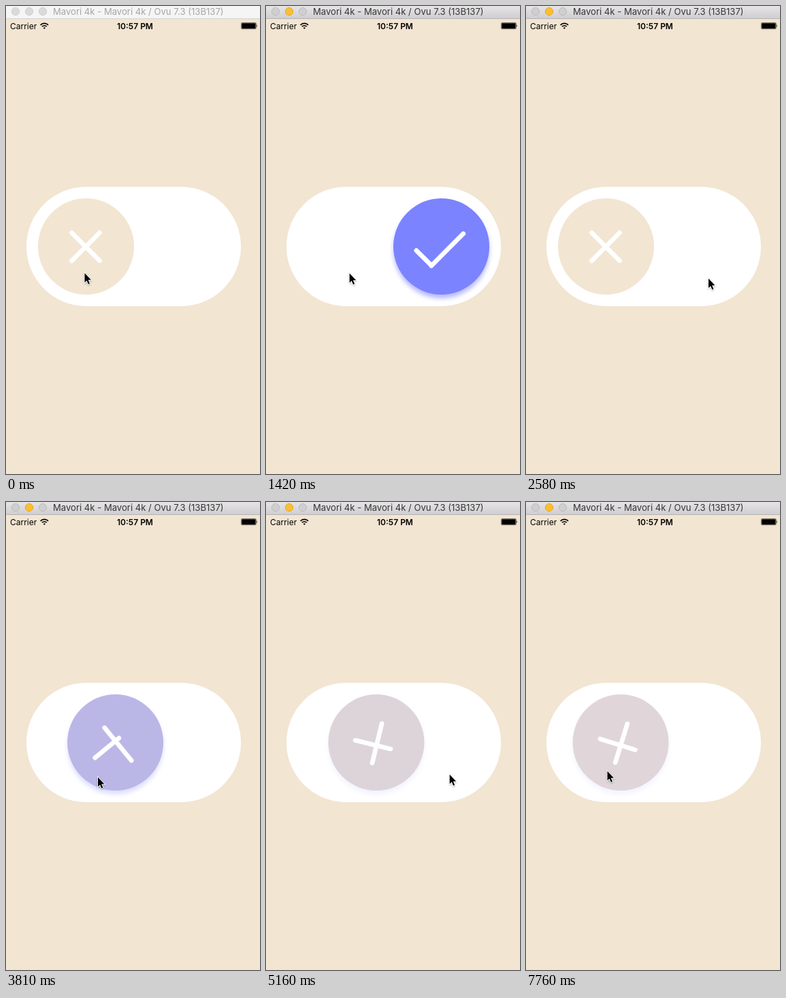
An HTML page that plays this animation: 373x686 px, repeating every 8000 ms.

```html
<!DOCTYPE html>
<html lang="en">
<head>
<meta charset="utf-8">
<title>Toggle switch</title>
<style>
  html, body { margin: 0; width: 100%; height: 100%; overflow: hidden; background: #f2e5d2; }
  svg { display: block; width: 373px; height: 686px; }
  text { font-family: Inter, Roboto, sans-serif; font-size: 12px; }
  #bar { fill: #f5f5f5; }
  #edge { fill: #d4d4d4; }
  #title { font-size: 13.1px; fill: #a6a6a6; }
  #lights { fill: #dadada; stroke: #cecece; }
  .active #bar { fill: url(#chrome); }
  .active #edge { fill: #b5b3b5; }
  .active #title { fill: #363636; }
  .active #lights { fill: #d0cfd0; stroke: #bcbbbc; }
  .active #minimize { fill: #fdbf2f; stroke: #e4a528; }
</style>
</head>
<body>
<svg id="stage" viewBox="0 0 373 686">
  <defs>
    <linearGradient id="chrome" x2="0" y2="1">
      <stop stop-color="#e6e4e6"/><stop offset="1" stop-color="#d0ced0"/>
    </linearGradient>
    <filter id="blur" x="-20%" y="-20%" width="140%" height="140%">
      <feGaussianBlur stdDeviation="3"/>
    </filter>
    <filter id="soft" x="-50%" y="-50%" width="200%" height="200%">
      <feDropShadow dx="0" dy="1" stdDeviation="1" flood-opacity=".35"/>
    </filter>
  </defs>
  <rect width="373" height="686" fill="#f2e5d2"/>

  <rect id="bar" width="373" height="18"/>
  <rect id="edge" y="18" width="373" height="1"/>
  <g id="lights">
    <circle cx="14" cy="8" r="5.6"/>
    <circle id="minimize" cx="34" cy="8" r="5.6"/>
    <circle cx="54" cy="8" r="5.6"/>
  </g>
  <text id="title" x="69" y="13">Mavori 4k - Mavori 4k / Ovu 7.3 (13B137)</text>

  <text x="6" y="33.6">Carrier</text>
  <g fill="none" stroke="#000" stroke-width="1.7">
    <path d="M50.6 27.8a7.9 7.9 0 0 1 11.4 0M52.9 30.2a4.7 4.7 0 0 1 6.8 0"/>
    <path d="M54.6 31.9a2.6 2.6 0 0 1 3.4 0L56.3 33.8z" fill="#000" stroke="none"/>
  </g>
  <text x="189.5" y="33.6" text-anchor="middle" font-weight="600">10:57 PM</text>
  <rect x="345.4" y="24.5" width="22" height="9.2" rx="1.6" fill="none" stroke="#000" stroke-opacity=".75" stroke-width=".7"/>
  <rect x="346.2" y="25.3" width="20.4" height="7.6" rx=".8"/>
  <path d="M368.3 27.3q1.6 1.8 0 3.6z"/>

  <rect x="30" y="265" width="315" height="175" rx="87.5" fill="#fff"/>
  <g id="knob">
    <circle id="shadow" cy="5.5" r="70.5" fill="#7b83fe" filter="url(#blur)"/>
    <circle id="disc" r="70.5"/>
    <g stroke="#fff" stroke-width="6.7" stroke-linecap="round">
      <line id="short"/><line id="long"/>
    </g>
  </g>
  <path id="cursor" d="M.5 .5V14.3L3.6 11.4 5.9 16.8 8 15.9 5.7 10.6H10Z"
        stroke="#fff" stroke-width="1.6" paint-order="stroke" filter="url(#soft)"/>
</svg>
<script>
const LOOP = 8000, LEFT = 117.5, TRAVEL = 140;
const OFF = [242, 229, 210], ON = [123, 131, 254];

// Every tap flips the switch; the knob trails its colour and icon a little
const TAPS = [925, 2250, 3672, 4948], FLIP = 290, LAG = 32;

// From here on the knob is dragged, following the pointer at a reduced rate
const DRAG_START = 5640, GRAB_X = 91, DRAG_RATE = .77;

// Pointer moves: start, end, then where it comes to rest
const HOME = [115, 391];
const MOVES = [
  [1370, 1760, 267.5, 399],
  [2710, 3100, 134.5, 403],
  [3820, 4100, 299, 399],
  [4350, 4570, 281, 399],
  [5120, 5390, GRAB_X, 397],
  [DRAG_START, 6480, 128, 397],
  [6440, 6760, 178, 397],
  [6890, 7340, 141, 396],
  [7590, 7760, 119, 394],
];

const $ = id => document.getElementById(id);
const lerp = (a, b, k) => a + (b - a) * k;
const ease = (t, start, end) => {
  const u = Math.max(0, Math.min(1, (t - start) / (end - start)));
  return u * u * (3 - 2 * u);
};

const pointerAt = t => MOVES.reduce(([x, y], [start, end, toX, toY]) => {
  const k = ease(t, start, end);
  return [lerp(x, toX, k), lerp(y, toY, k)];
}, HOME);

// 0 is off, 1 is on; taps alternate between the two
const flipped = t => TAPS.reduce((on, tap, i) => lerp(on, 1 - i % 2, ease(t, tap, tap + FLIP)), 0);

// Each stroke drifts, resizes and makes a half turn about its own middle
function stroke(id, q, midX, midY, length, angle) {
  const half = lerp(58, length, q) / 2, a = (angle - 180 * q) * Math.PI / 180;
  const dx = half * Math.cos(a), dy = half * Math.sin(a);
  const x = lerp(-.5, midX, q), y = lerp(.3, midY, q);
  const ends = { x1: x - dx, y1: y - dy, x2: x + dx, y2: y + dy };
  for (const name in ends) $(id).setAttribute(name, ends[name]);
}

function draw(t) {
  const [x, y] = pointerAt(t);
  const dragged = t < DRAG_START ? 0 : (x - GRAB_X) * DRAG_RATE / TRAVEL;
  const place = flipped(t - LAG) + dragged, look = flipped(t) + dragged;

  $('stage').classList.toggle('active', t >= 840);
  $('knob').setAttribute('transform', `translate(${LEFT + TRAVEL * place} 352.5)`);
  $('disc').setAttribute('fill', `rgb(${OFF.map((v, i) => Math.round(lerp(v, ON[i], look)))})`);
  $('shadow').setAttribute('opacity', look * .55);
  stroke('short', look, -25.75, 16.75, 31, 45);
  stroke('long', look, 8.75, 4.75, 66.5, 135);
  $('cursor').setAttribute('transform', `translate(${x} ${y})`);
}

function tick() {
  draw(performance.now() % LOOP);
  requestAnimationFrame(tick);
}
tick();
</script>
</body>
</html>
```
